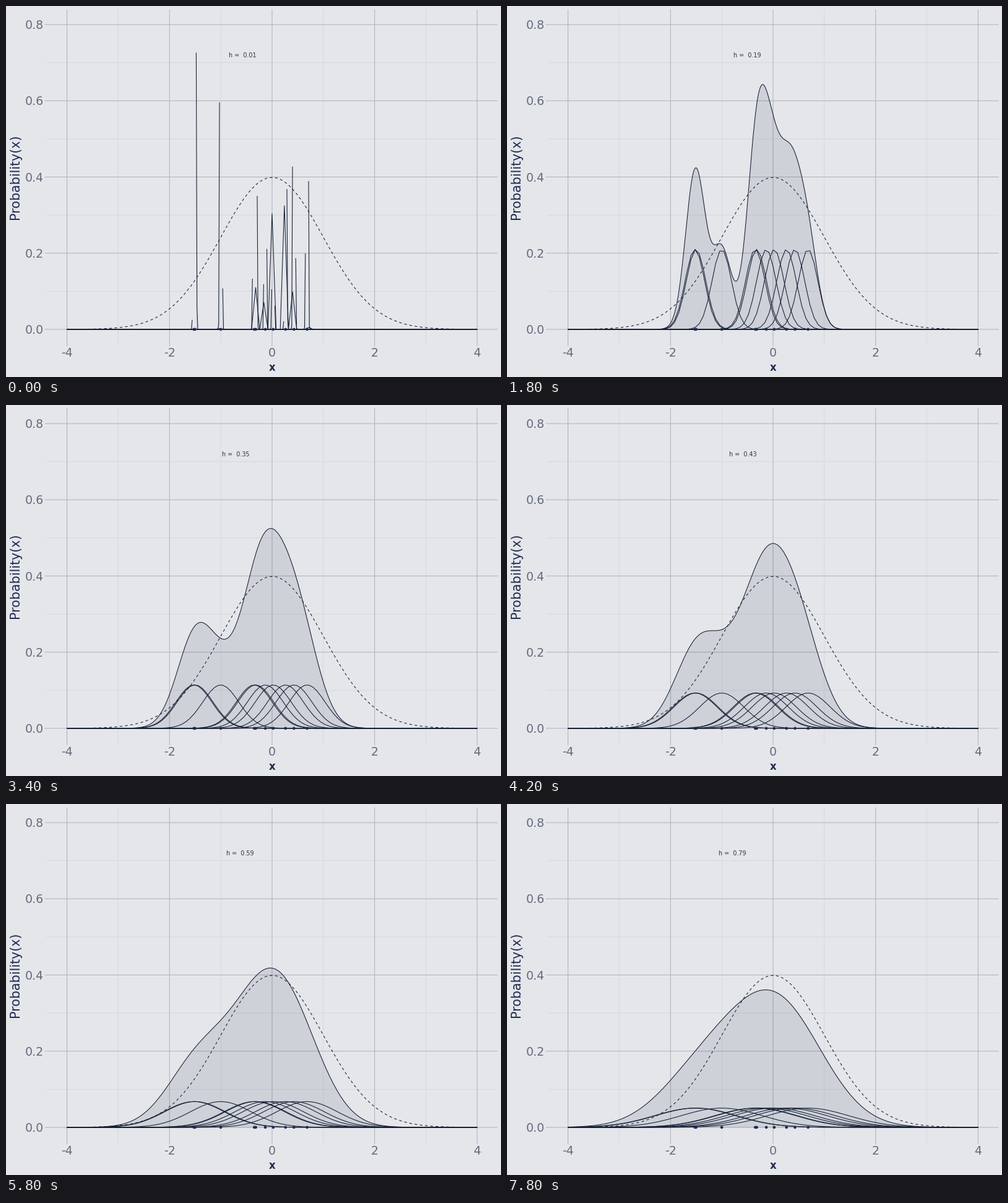
Write a matplotlib script that moves like this. It is 800x600 px and loops after 8 s.

```python
import numpy as np
import matplotlib.pyplot as plt
from matplotlib.animation import FuncAnimation
from matplotlib.patches import Circle

W, H, DPI = 800, 600, 100
PX = 72 / DPI                       # points per pixel
FRAMES, INTERVAL = 40, 200

BG, MAJOR, MINOR = "#e4e6ea", "#b1b4bc", "#cacdd4"
INK, NAVY, TICK, NOTE = "#141e33", "#1f2b50", "#646b7b", "#2b303d"
FILL = (0.05, 0.10, 0.25, 0.10)
STROKE = 1.067                      # line width in pixels
Y_TOP = 0.8

SAMPLE = np.array([-1.5248, -1.5021, -1.0007, -0.3468, -0.3185,
                   -0.1316, 0.0227, 0.2624, 0.4272, 0.6835])
GRID = np.linspace(-4, 4, 101)
FINE = np.linspace(-4, 4, 512)

# Label position: key frames and the text centre at each
NOTE_KEYS = [0, 5, 9, 17, 25, 33, 39]
NOTE_X = [382.3, 413.7, 388, 371, 392.3, 364, 364]


def sx(x):
    return 430 + 82.85 * np.asarray(x)


def sy(y):
    return 522.9 - 616 * np.asarray(y)


def normal(x, sd=1.0):
    return np.exp(-0.5 * (x / sd) ** 2) / (sd * np.sqrt(2 * np.pi))


def censor(y):
    """Values above the axis limit break the line."""
    return np.where(y > Y_TOP, np.nan, y)


def density(h):
    """Kernel density by linear binning, as plotting software computes it."""
    n = len(FINE)
    lo, hi = -4 - 4 * h, 4 + 4 * h
    bins = np.linspace(lo, hi, n)
    pos = (SAMPLE - lo) / (hi - lo) * (n - 1)
    left = pos.astype(int)
    frac = pos - left
    weight = np.zeros(n)
    np.add.at(weight, left, (1 - frac) / len(SAMPLE))
    np.add.at(weight, left + 1, frac / len(SAMPLE))
    k = np.arange(n)
    kernel = normal((k[:, None] - k) * (hi - lo) / (n - 0.5), h)
    return np.interp(FINE, bins, kernel @ weight)


fig = plt.figure(figsize=(W / DPI, H / DPI), dpi=DPI, facecolor=BG)
ax = fig.add_axes([0, 0, 1, 1])
ax.set_xlim(0, W)
ax.set_ylim(H, 0)
ax.axis("off")


def stroke(xs=(), ys=(), color=INK, width=STROKE, z=4, **kw):
    line, = ax.plot(xs, ys, color=color, lw=width * PX, zorder=z, snap=False,
                    solid_capstyle="butt", dash_capstyle="butt", **kw)
    return line


def label(x, y, s, size, color, **kw):
    style = dict(family="DejaVu Sans", ha="center", va="baseline")
    style.update(kw)
    return ax.text(x, y, s, fontsize=size * PX, color=color, **style)


# Grid and axis text
for v in (-3, -1, 1, 3):
    stroke([sx(v)] * 2, [5.5, 547.6], MINOR, STROKE / 2, 0)
for v in (0.1, 0.3, 0.5, 0.7):
    stroke([65.5, 794.5], [sy(v)] * 2, MINOR, STROKE / 2, 0)
for v in (-4, -2, 0, 2, 4):
    stroke([sx(v)] * 2, [5.5, 550.3], MAJOR, z=1)
    label(sx(v), 567, str(v), 19, TICK)
for v in (0.0, 0.2, 0.4, 0.6, 0.8):
    stroke([62.7, 794.5], [sy(v)] * 2, MAJOR, z=1)
    label(61, sy(v) + 7, f"{v:.1f}", 19, TICK, ha="right")

label(430, 590, "x", 16.5, NAVY, weight="bold")
label(21.5, 276.5, "Probability(x)", 20.7, NAVY, rotation=90,
      rotation_mode="anchor")

note = label(0, 83, "", 9.6, NOTE, zorder=2)
outline = stroke()
bumps = [stroke() for _ in SAMPLE]
stroke(sx(GRID), sy(normal(GRID)), dashes=(4, 4))
for m in SAMPLE:
    ax.add_patch(Circle((sx(m), sy(0)), 2.3, fc=NAVY, lw=0, zorder=5))
areas = []


def update(i):
    h = 0.01 + 0.02 * i
    note.set_text(f"h =  {h:.2f}")
    note.set_x(np.interp(i, NOTE_KEYS, NOTE_X))
    total = censor(density(h))
    outline.set_data(sx(FINE), sy(total))
    while areas:
        areas.pop().remove()
    areas.append(ax.fill_between(sx(FINE), sy(total), sy(0),
                                 where=np.isfinite(total), color=FILL,
                                 lw=0, zorder=3))
    for line, m in zip(bumps, SAMPLE):
        y = normal(GRID - m, h) / len(SAMPLE)
        line.set_data(sx(GRID), sy(censor(y)))
    return [note, outline, *areas, *bumps]


anim = FuncAnimation(fig, update, frames=FRAMES, interval=INTERVAL,
                     repeat=True, repeat_delay=0, blit=False)
plt.show()
```
